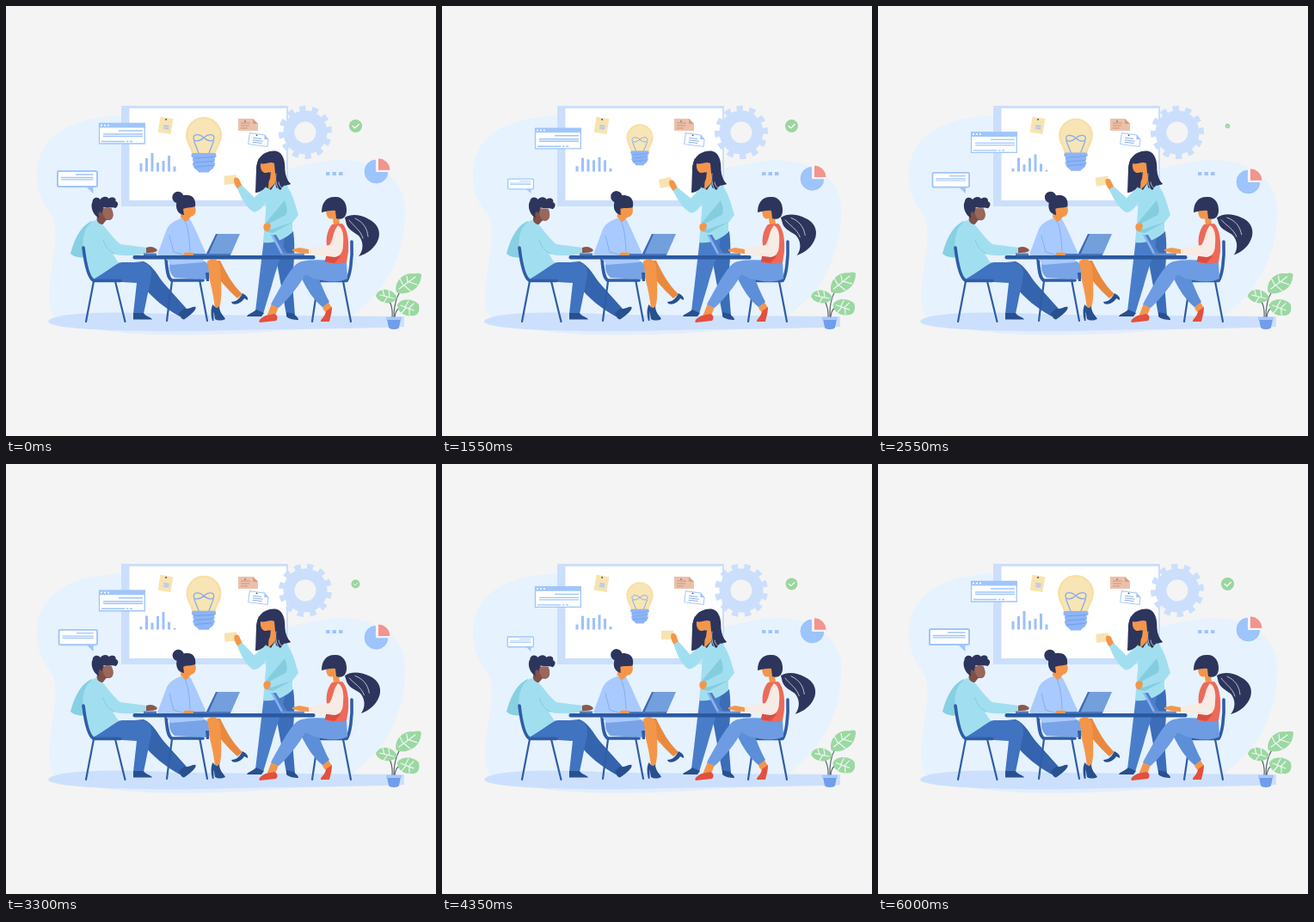
An HTML page that plays this animation: 500 px wide and 500 px high, repeating every 6100 ms.

```html
<!DOCTYPE html>
<html lang="en">
<head>
<meta charset="utf-8">
<title>Team meeting</title>
<style>
  html, body { margin: 0; height: 100%; overflow: hidden; background: #f4f4f4; }
  svg { display: block; width: 100vw; height: 100vh; --slow: 0; --mid: 0; --fast: 0; --drift: 0; --sway: 0; --turn: 0deg; }
  .line { fill: none; stroke-linecap: round; stroke-linejoin: round; }
  .navy { fill: #2d355c; }
  .skin { fill: #f4964a; }
  .blue { stroke: #a0c5fb; }
  .chair { stroke: #2f5da6; stroke-width: 2.2; }
  .chair path:first-child { stroke-width: 3.6; }
  .sheet { fill: #f8e3b0; }

  #window { transform: translateY(calc(11px * var(--slow))); }
  #pie { transform: translateY(calc(12px * var(--drift))); }
  #bubble { transform-origin: 107px 218px; transform: scale(calc(1 - .354 * var(--mid))); }
  #bulb { transform-origin: 230px 161.5px; transform: scale(calc(1 - .256 * var(--mid))); }
  #tick { transform-origin: 406.5px 139.5px; transform: scale(calc(1 - .96 * var(--fast))); }
  #gear { transform-origin: 348px 147px; transform: rotate(var(--turn)); }
  #plant { transform-origin: 451px 362px; transform: rotate(calc(-2.3deg * var(--mid))); }
  #tail { transform-origin: 396px 247px; transform: rotate(calc(-5deg * var(--drift))); }
  #manHead { transform-origin: 109px 252px; transform: translateX(1.5px) rotate(calc(4deg * var(--mid))); }
  #bunHead { transform-origin: 208px 250px; transform: rotate(calc(6deg * var(--mid))); }
  #raised { transform-origin: 303px 216px; transform: rotate(calc(1.3deg - 4.5deg * var(--sway))); }
</style>
</head>
<body>
<svg id="stage" viewBox="0 0 500 500">
  <!-- backdrop -->
  <path fill="#e6f2fe" d="M140 127.500C96 127.500 58 140 44 165C30 191 35 221 52 241C63 258 55 290 52 315C47 345 52 358 60 366H396C412 352 428 340 440 322C455 300 466 265 464 232C461 196 425 178 385 179C360 181 345 186 328 189V127.500Z"/>
  <path fill="#e2eefd" d="M90 372C130 384 220 386 330 377L420 372Z"/>
  <path fill="#cce0fd" d="M49 367C52 356 125 354 205 359L463 361V373C400 376 330 375 265 377C180 380 52 378 49 367Z"/>

  <!-- board -->
  <path fill="#cbdffc" d="M134 116H328V233H134Z"/>
  <path fill="#fff" d="M143.500 119H326V226H143.500Z"/>
  <g id="bars" fill="#9dc1fa"></g>

  <g id="bulb">
    <path fill="#f8e5b5" stroke="#f7dfa6" stroke-width="2.500" d="M210.300 150A19.700 19.700 0 1 1 249.700 150C249.700 160 244 163 243 171H217C216 163 210.300 160 210.300 150Z"/>
    <path class="line" stroke="#84abed" stroke-width="1.300" d="M224 171L218.500 157M236 171L241.500 157M230 153C224 148 218 149 218 153.500C218 158 225 158 230 153C236 148 242 149 242 153.500C242 158 235 158 230 153Z"/>
    <g fill="#8db5f7">
      <rect x="215.500" y="171" width="29" height="5.500" rx="2.500"/>
      <rect x="217" y="176" width="26" height="5.500" rx="2.500"/>
      <rect x="217" y="181" width="26" height="5.500" rx="2.500"/>
      <path d="M218 186H242C242 190 237 190 236 193.500H224C223 190 218 190 218 186Z"/>
    </g>
    <path class="line" stroke="#6d98e2" stroke-width=".8" d="M218 177L242 175.500M219 182L241 180.500M220 187L240 185.500"/>
  </g>

  <g transform="rotate(9 186 139)">
    <rect class="sheet" x="178" y="130" width="15" height="18"/>
    <rect x="183" y="138" width="7" height="6" fill="#d3dbe2"/>
    <path stroke="#9fb5d6" stroke-width=".8" d="M184 139.500H189.500M184 142H189.500"/>
    <circle cx="185" cy="132" r="1" fill="#48507a"/>
  </g>
  <path fill="#ebc0aa" d="M270 131H287L293 137V145H270Z"/>
  <path fill="#d99d81" d="M287 131V137H293Z"/>
  <path stroke="#d29578" d="M273 136H284M273 139H283M273 142H281"/>
  <circle cx="278" cy="134" r=".8" fill="#48507a"/>
  <g transform="rotate(7 293 155)">
    <path fill="#fff" stroke="#a0c5fb" d="M282.500 149H300L305 154V162H282.500Z"/>
    <path fill="#a0c5fb" d="M300 149V154H305Z"/>
    <path stroke="#8eaee4" d="M287 154H297M287 156.500H299M287 159H298"/>
    <circle cx="291" cy="150.500" r=".9" fill="#48507a"/>
  </g>

  <!-- floating items -->
  <g id="window">
    <path fill="#fff" stroke="#a0c5fb" stroke-width="1.300" d="M108.500 136.500H161.300V160H108.500Z"/>
    <path fill="#a0c5fb" d="M108 136H162V141.500H108Z"/>
    <g fill="#fff"><circle cx="111" cy="138.700" r="1"/><circle cx="115" cy="138.700" r="1"/><circle cx="119" cy="138.700" r="1"/></g>
    <path class="blue" stroke-width="1.400" d="M131 145H159M113 149H159M113 151.500H159M111 157.500H138M140 157.500H142.500M144 157.500H147"/>
  </g>
  <g id="bubble">
    <path fill="#a0c5fb" d="M93 210H101.500V218Z"/>
    <rect x="60" y="192" width="46" height="18" rx="1.500" fill="#fff" stroke="#a0c5fb" stroke-width="2"/>
    <path class="blue" stroke-width="1.300" d="M81 196H101.500M64 199.500H101.500M64 201.800H101.500"/>
  </g>
  <g id="gear" fill="none" stroke="#cbdffc">
    <circle cx="348" cy="147" r="19" stroke-width="13"/>
    <circle cx="348" cy="147" r="27.500" stroke-width="7" pathLength="24" stroke-dasharray="1 1" transform="rotate(-14 348 147)"/>
  </g>
  <g id="tick">
    <circle cx="406.500" cy="139.500" r="7.600" fill="#9ad6a0"/>
    <path class="line" stroke="#fff" stroke-width="1.200" d="M403 139.500L405.700 142L410.300 137.500"/>
  </g>
  <path fill="#a0c5fb" d="M372 193H376.500V197H372ZM379.500 193H384V197H379.500ZM387 193H391.500V197H387Z"/>
  <g id="pie" stroke="#fff" stroke-width=".8">
    <path fill="#9dc4fc" d="M430.500 192.500V178A14.500 14.500 0 1 0 445 192.500Z"/>
    <path fill="#f1958e" d="M432.500 191.300V176.700A14.600 14.600 0 0 1 447.100 191.300Z"/>
  </g>

  <!-- seated man -->
  <path fill="#3564ae" d="M128 300L160 297C171 301 177 315 184 323L210 352L202 361C186 352 170 340 158 324Z"/>
  <path fill="#28508f" d="M201 357L207 352C213 353 217 349 220.500 350C222 353 214 360 207 364.500C204 364 202 361 201 357Z"/>
  <path fill="#4073c0" d="M101 319C108 306 124 299 135 298H158C168 299 171 307 168 319L160 358H148L152 322Z"/>
  <path fill="#28508f" d="M148 357H160C162 361 168 361 170 364.500H148Z"/>
  <path fill="#86d0e2" d="M100 250C87 255 79 272 75 288C81 293 88 293 94 292L102 262Z"/>
  <path fill="#a1dff0" d="M104 249L110 252C117 258 123 269 133 277L164 281V288C148 291 134 291 124 288L131 299C122 304 112 312 101 318C94 307 94 297 90 287C88 270 91 254 104 249Z"/>
  <path class="line" stroke="#82cbe0" d="M113 272C116 281 120 285 126 288"/>
  <path fill="#8a584c" d="M163 281C168 279 173 280 176 284C175 287 167 287 163 287Z"/>
  <g id="manHead">
    <path fill="#7d5147" d="M105 236H121C124 241 124 248 119 249H115L111 254C108 254 105 252 104 249Z"/>
    <path fill="#9a675a" d="M111 235H121C124 241 124 248 118 249C113 248 110 243 111 235Z"/>
    <path class="navy" d="M103 244C98 239 97 231 99 228C99 223 105 221 108 225C111 221 116 221 118 224C122 221 127 223 126 227C130 228 129 233 126 235C122 233 117 236 112 234L110 241C107 237 105 240 107 247Z"/>
  </g>
  <g class="line chair"><path d="M90 281C92 298 96 316 102 319.500H133"/><path d="M102 320L93 367M127 320L138.500 367"/></g>

  <!-- seated woman with bun -->
  <g class="line chair"><path d="M186 294C187 306 188 317 193 319H229"/><path d="M193 320L187 366M225 318L234 366"/></g>
  <path fill="#e9893f" d="M236 296H249C256 310 263 324 275 335L269 340C256 328 248 318 242 310Z"/>
  <path class="skin" d="M234 297C241 292 248 295 249 303C250 322 252 338 248 351H243C241 334 237 318 234 309Z"/>
  <path fill="#27508f" d="M262 344C268 344 272 340 275 334C278 336 282 338 281 342L277 340C274 345 268 348 263 346ZM240.500 347C244 352 246 352 248 349C248 357 254 361 255 364C251 366 246 366 243 364L241.500 355V366H240C238 359 238 352 240.500 347Z"/>
  <path fill="#78a3e6" d="M191 297H230C236 297 236 307 236 318C220 317 205 317 196 316C190 311 189 304 191 297Z"/>
  <path fill="#2f5da6" d="M232 310H236V320H233Z"/>
  <path fill="#a8caff" d="M203 247L214 248C220 258 225 272 232 286L229 298L192 301C188 296 184 291 176 289L186 262C189 253 196 250 203 247Z"/>
  <path class="line" stroke="#85adec" d="M190 267L195 286L208 290M207 249C212 256 213 268 214 285"/>
  <path class="skin" d="M207 287C212 286 218 286 221 289V291H207Z"/>
  <g id="bunHead">
    <path class="skin" d="M204 231H219C222 237 221 244 215 245L211 250C208 252 206 247 203 246Z"/>
    <circle class="navy" cx="200" cy="222.500" r="6.700"/>
    <path class="navy" d="M198 232C198 224 204 219 211 220C218 220 221 226 220 233C215 235 209 234 206 236L207 243C201 242 198 238 198 232Z"/>
  </g>

  <!-- standing woman -->
  <path fill="#3b6db9" d="M310 272L334 262C337 282 334 302 333 322L336 360L326 359L316 304Z"/>
  <path fill="#4a7dc9" d="M300 270H324C322 288 314 305 309 325L299 358L290 355L296 304Z"/>
  <path fill="#28508f" d="M291 353L300 357L297 361H280C281 358 287 357 291 353ZM326 356L335 358C337 361 340 362 340 365C335 365 329 364 326 361Z"/>
  <path class="navy" d="M311 168.500C298 169 291 178 291 190L298 215L316 213H322C323 209 327 208 331 207C326 202 325 198 324.500 192C325 178 321 168 311 168.500Z"/>
  <path class="skin" d="M295 183C302 185 307 180 312 183L314 205L305 214L306 193C300 196 295 193 295 183Z"/>
  <g id="raised">
    <path class="sheet" d="M253 199L267 197L269 207L254 209Z"/>
    <path class="skin" d="M265 201C268 199 271 201 272 205L275 211L270 214C266 210 264 205 265 201Z"/>
    <path fill="#a1dff0" d="M274 209L289 223L302 210L306 220C302 231 296 239 289 240C280 236 273 223 269 213Z"/>
  </g>
  <path fill="#a1dff0" d="M303 211L308 214L314 205L324 207C333 215 336 230 340 243L333 252V263C326 270 312 277 299 275L302 240Z"/>
  <path fill="#84cddf" d="M324 226C327 234 328 239 325 243L306 253L308 260L334 251L310 264L302 262L303 251Z"/>
  <path class="skin" d="M300 254C304 251 308 252 308 256L305 262C301 263 298 259 300 254Z"/>
  <path class="navy" d="M294 177C290 186 291 202 290 217C298 217 303 210 307 201L308 193C301 197 295 193 296 183ZM312 181C315 190 312 201 314 211L319 214L323 209L331 207C325 201 325 193 322 183Z"/>
  <path class="line" stroke="#f4f4f4" stroke-width=".7" d="M314 195C313 202 314 208 317 213M317 205C318 210 320 212 322 211"/>

  <!-- seated woman with ponytail -->
  <g class="line chair"><path d="M402 274C403 295 400 314 396 319.500H359"/><path d="M363 320L356 367M392 320L401 367"/></g>
  <g id="tail">
    <path class="navy" d="M394 246C402 241 413 243 422 248C432 253 436 262 433 271C429 282 420 288 410 291C416 284 416 274 410 267C403 262 396 259 395 250Z"/>
    <path class="line" stroke="#f4f4f4" stroke-width=".7" d="M399 249C404 256 412 260 415 270M406 247C415 251 420 258 421 268"/>
  </g>
  <path class="skin" d="M372 236H386L388 254L381 255L380 247C375 249 372 245 372 236Z"/>
  <path class="navy" d="M367 240C367 229 372 222 382 222C391 221 397 229 396 239C395 247 390 249 384 247L383 238C378 237 372 239 367 240Z"/>
  <path class="skin" d="M367 347L374 343L379 351L374 358L369 353ZM309 346L317 350L313 360L303 361Z"/>
  <path fill="#e2503f" d="M302 360L312 358C317 360 316 364 314 366L295 368C293 365 297 363 302 360ZM372 355L379 350C379 356 377 363 376 367H366C366 363 371 362 372 355Z"/>
  <path fill="#5d8ed8" d="M345 306L362 312C367 325 371 335 376 344L368 350C358 342 350 330 343 315Z"/>
  <path fill="#6d9ce3" d="M396 298L397 317C386 323 371 320 358 317L348 312C341 325 328 341 317 351L308 347C320 325 332 302 341 298C352 294 377 295 396 298Z"/>
  <path fill="#ed6a58" d="M379 254L391 253C397 259 399 272 398 286L396 298C386 301 374 300 371 297L374 283C371 273 373 261 379 254Z"/>
  <path fill="#d94f43" d="M373 286L389 291L382 299L371 297Z"/>
  <path fill="#f6ebe5" d="M386 255C392 258 393 268 392 277C392 286 389 291 382 292L351 288V282L376 278C381 271 380 262 386 255Z"/>
  <path class="skin" d="M333 283L341 281L352 283V288L341 287L333 285Z"/>

  <!-- table and laptops -->
  <path fill="#3f6ab2" d="M244 265H249L237 290H232Z"/>
  <path fill="#739fdd" d="M246 265H272L261 290H235Z"/>
  <path fill="#4b78bd" d="M218 288H261V291H218ZM160 287.500H175V291H160Z"/>
  <path fill="#89b2f3" d="M308 266H312L325 289H320Z"/>
  <path fill="#527fc9" d="M311 266H314L328 289H323Z"/>
  <path fill="#668fd0" d="M320 287.500H347V290.500H320Z"/>
  <rect x="147.500" y="290" width="212" height="4.500" rx="2" fill="#2b599f"/>

  <!-- plant -->
  <g id="plant">
    <path class="line" stroke="#57666c" stroke-width="1.200" d="M449 362C450 350 447 342 440 337M451 362C451 343 457 330 467 322M452 362C453 351 459 349 467 350"/>
    <g fill="#9bd8a2">
      <path d="M454 333C451 322 460 311 472 311C476 312 480 309 483 312C483 320 479 328 472 331C466 335 459 335 454 333Z"/>
      <path d="M430 337C433 327 449 327 455 339C452 347 435 348 430 337Z"/>
      <path d="M455 348C458 339 474 340 480 347C482 356 478 361 471 360C463 361 456 356 455 348Z"/>
    </g>
    <path class="line" stroke="#f1f6f4" stroke-width="1.200" d="M457 329L476 315M462 325L458 317M467 321L466 314M469 321L478 324M463 325L470 331M435 336L451 340M440 337L438 330M446 338L445 330M443 339L439 345M459 348L474 354M464 350L468 343M468 352L474 346M465 351L460 357M469 353L469 359"/>
  </g>
  <path fill="#719eeb" d="M443 364H459L457 374C456 376.500 446 376.500 445 374Z"/>
  <path fill="#a8c8fa" d="M442 361.500H460V365H442Z"/>
</svg>
<script>
  const stage = document.getElementById('stage');
  const LOOP = 6100, END = 6000, STEP = 50, DRIFT = 5000;

  // Bar heights at the start and at the middle of the loop.
  const heights = [[9.5, 3.3], [15.5, 16], [21.5, 7.5], [10.3, 15.8], [12.5, 20.5], [18.5, 8.5], [6, 1.5]];
  const bars = heights.map((_, i) => {
    const bar = document.createElementNS('http://www.w3.org/2000/svg', 'rect');
    bar.setAttribute('x', 155.5 + i * 6.5);
    bar.setAttribute('width', 3);
    document.getElementById('bars').append(bar);
    return bar;
  });

  const wave = (t, period) => (1 - Math.cos(2 * Math.PI * t / period)) / 2;

  function draw(now) {
    const t = Math.min(Math.floor(now % LOOP / STEP) * STEP, END);
    const slow = wave(t, END);
    const vars = {
      slow,
      mid: wave(t, 3000),
      fast: wave(t, 1500),
      drift: wave(Math.min(t, DRIFT), DRIFT),
      sway: Math.sin(2 * Math.PI * t / END).toFixed(4),
      turn: t / END * 360 + 'deg'
    };
    for (const name in vars) stage.style.setProperty('--' + name, vars[name]);
    bars.forEach((bar, i) => {
      const [from, to] = heights[i];
      const h = from + (to - from) * slow;
      bar.setAttribute('y', 192.5 - h);
      bar.setAttribute('height', h);
    });
  }

  const start = performance.now();
  function tick() {
    draw(performance.now() - start);
    requestAnimationFrame(tick);
  }
  tick();
</script>
</body>
</html>
```
